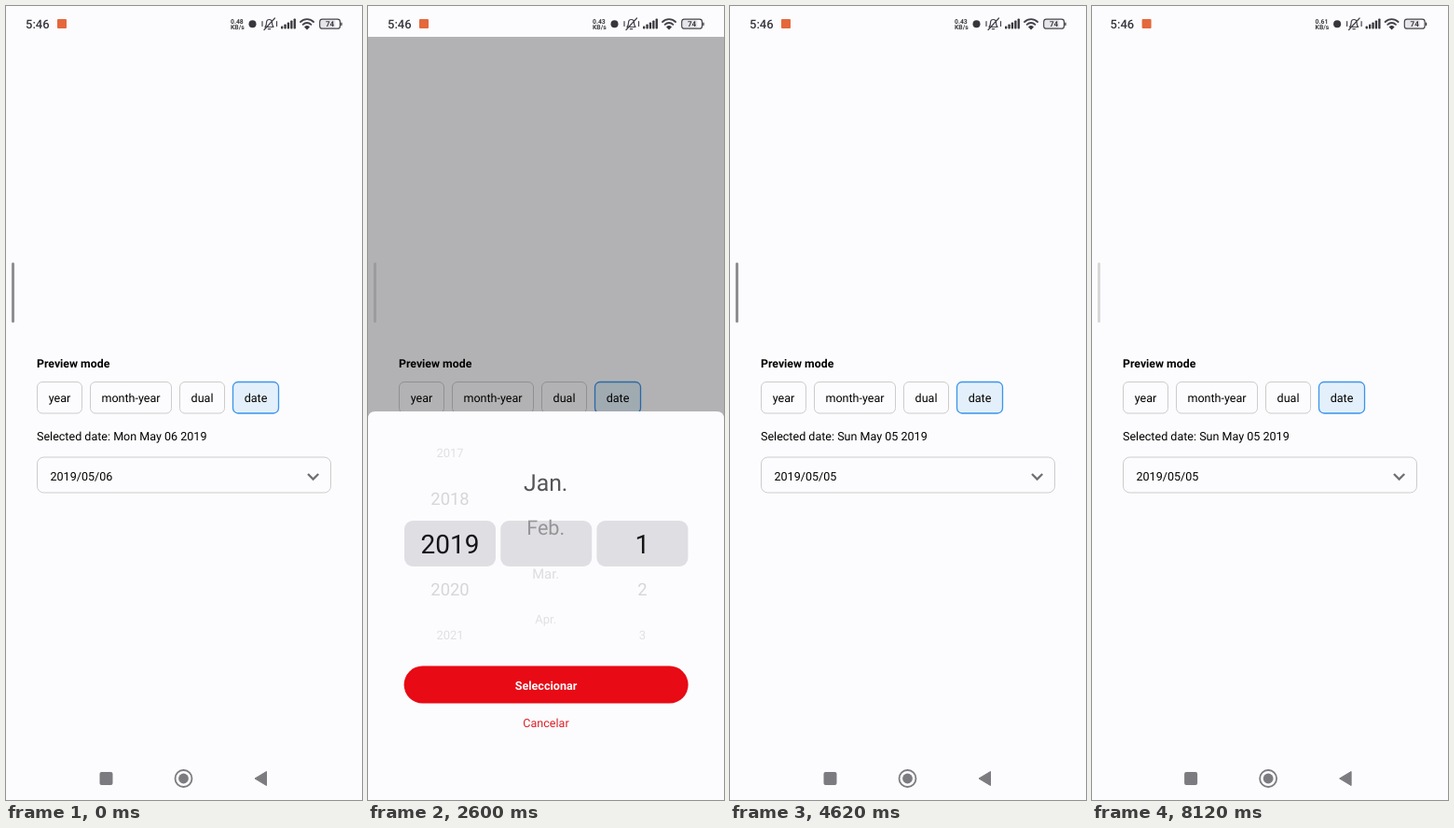
Recreate the animation shown at these times as an HTML page. Size 382 by 850 pixels, loop 8.16 s.

```html
<!DOCTYPE html>
<html lang="en">
<head>
<meta charset="utf-8">
<title>Date picker preview</title>
<style>
  html, body { margin: 0; width: 100%; height: 100%; overflow: hidden; background: #fcfcfe; }
  svg { display: block; width: 100vw; height: 100vh; font: 12.55px Roboto, sans-serif; text-rendering: geometricPrecision; }
  .mid { text-anchor: middle; }
  .bold { font-weight: 700; }
  .box { fill: none; stroke: #cccccc; }
  .line { fill: none; stroke: #42424a; stroke-linecap: round; stroke-linejoin: round; }
</style>
</head>
<body>
<svg viewBox="0 0 382 850">
  <defs>
    <clipPath id="wheelClip"><rect y="454" width="382" height="245"/></clipPath>
  </defs>
  <rect width="382" height="850" fill="#fcfcfe"/>

  <g id="page">
    <text class="bold" x="33" y="387" font-size="12.3">Preview mode</text>
    <g id="chips"></g>
    <text id="selected" x="33" y="465"></text>
    <g id="field">
      <rect class="box" x="33.5" y="483" width="315" height="38" rx="7"/>
      <text id="value" x="47.5" y="508"></text>
      <path d="M324 501l5.6 5.6 5.6-5.6" fill="none" stroke="#707074" stroke-width="2.3"/>
    </g>
  </g>

  <g id="modal">
    <rect y="33" width="382" height="817" fill="#000" fill-opacity=".295"/>
    <path d="M0 850V442q0-8 8-8H374q8 0 8 8V850z" fill="#fcfcfe"/>
    <g id="slots"></g>
    <g id="wheels" class="mid" clip-path="url(#wheelClip)"></g>
    <g id="button">
      <rect x="38.6" y="706.6" width="305" height="40" rx="20" fill="#e80a14"/>
      <text class="mid bold" x="191" y="731.5" fill="#fcfcfe">Seleccionar</text>
    </g>
    <text class="mid" x="191" y="771.5" fill="#dc2028">Cancelar</text>
  </g>

  <rect id="handle" x="6" y="274.5" width="3" height="64.5" rx="1.5"/>

  <g id="system">
    <g fill="#36363c">
      <text x="21" y="24" font-size="13" font-weight="500">5:46</text>
      <rect x="55" y="14" width="10" height="10" rx="1" fill="#e4683c"/>
      <g class="bold" font-size="6.8">
        <text id="speed" x="241" y="18.6"></text>
        <text x="241" y="25">KB/s</text>
      </g>
      <circle cx="264.5" cy="19.2" r="4"/>
      <path class="line" stroke-width="1.2" d="M278 22.5h9q-1.5-1.5-1.5-4.5a3 3.5 0 0 0-6 0q0 3-1.5 4.5M281.3 24.6h2.4M277 25.5L288.5 13M275 16.5v5M290.5 16.5v5"/>
      <g id="bars"></g>
      <path class="line" stroke-width="1.8" d="M316 17a10 10 0 0 1 14 0M318.6 19.8a6.3 6.3 0 0 1 8.8 0"/>
      <path d="M323 25.5l-3-3a4.3 4.3 0 0 1 6 0z"/>
      <rect x="337.5" y="15" width="16" height="8.5" rx="2" fill="#e6e6ea"/>
      <rect class="line" x="336.7" y="14.2" width="21.8" height="10" rx="2.8" stroke-width="1.2"/>
      <rect x="359.3" y="17.5" width="1.3" height="3.5" rx=".6"/>
      <text class="mid bold" x="347.6" y="22.2" font-size="8">74</text>
    </g>
    <g id="nav" fill="#7c7c80" stroke="#7c7c80">
      <rect x="100.5" y="820" width="14" height="14" rx="2" stroke="none"/>
      <circle cx="190.5" cy="827" r="9" fill="none" stroke-width="1.8"/>
      <circle cx="190.5" cy="827" r="5.4" stroke="none"/>
      <path d="M267 827l12.5-7.5v15z" stroke-linejoin="round"/>
    </g>
  </g>
</svg>

<script>
const LOOP = 8160;
const CENTER_Y = 576, ROW = 48.8;
const SECOND_OPEN = 4700, SECOND_CLOSE = 2720;   // delays of the repeated gestures
const SIZES = [28, 18.4, 13];
const GRAYS = [20, 214, 224];

const $ = id => document.getElementById(id);

function add(parent, tag, attrs, text = '') {
  const node = document.createElementNS('http://www.w3.org/2000/svg', tag);
  for (const name in attrs) node.setAttribute(name, attrs[name]);
  node.textContent = text;
  return parent.appendChild(node);
}

const lerp = (a, b, u) => a + (b - a) * u;
const clamp01 = u => Math.min(1, Math.max(0, u));

// Piecewise linear value through [time, value] keys.
function track(keys, t) {
  let value = keys[0][1];
  for (let i = 1; i < keys.length; i++) {
    const [t0, v0] = keys[i - 1], [t1, v1] = keys[i];
    if (t >= t0) value = lerp(v0, v1, clamp01((t - t0) / (t1 - t0)));
  }
  return value;
}

const withRepeat = (keys, delay) => keys.concat(keys.map(([t, v]) => [t + delay, v]));

const MODAL = [[1030, 0], [1250, 1], [4210, 1], [4430, 0], [5730, 0], [5950, 1], [6930, 1], [7150, 0]];
const BUTTON = withRepeat([[3960, 1], [4110, .2], [4160, .2], [4410, 1]], SECOND_CLOSE);
const FIELD = withRepeat([[870, 1], [1000, .3], [1100, .3], [1350, 1]], SECOND_OPEN);

const spin = (t, start, end, power) => 4 * (1 - (1 - clamp01((t - start) / (end - start))) ** power);

const MONTHS = 'Jan. Feb. Mar. Apr. May Jun. Jul. Aug. Sep. Oct. Nov. Dec.'.split(' ');
const count = (n, first) => Array.from({ length: n }, (_, i) => first + i);
const columns = [
  { x: 88, labels: count(12, 2015), flick: [1850, 2400, 3] },
  { x: 190.7, labels: MONTHS, flick: [2545, 2980, 3] },
  { x: 294.3, labels: count(31, 1), flick: [2980, 3710, 2.23] },
];

for (const [label, x, w] of [['year', 33, 49], ['month-year', 90, 88], ['dual', 186, 49], ['date', 243, 50]]) {
  const box = add($('chips'), 'rect', { class: 'box', x: x + .5, y: 402.5, width: w - 1, height: 33.5, rx: 5.5 });
  if (label === 'date') box.setAttribute('style', 'fill:#e3f0fb;stroke:#3a94ec;stroke-width:1.3');
  add($('chips'), 'text', { class: 'mid', x: x + w / 2, y: 424 }, label);
}
for (let i = 0; i < 5; i++) {
  const h = 3 + 2 * i;
  add($('bars'), 'rect', { x: 295 + 3.4 * i, y: 24.5 - h, width: 2.3, height: h, rx: .8 });
}
columns.forEach((column, i) => {
  add($('slots'), 'rect', { x: 39 + 103.2 * i, y: 551, width: 98, height: 49, rx: 9, fill: '#dfdfe3' });
  column.items = column.labels.map(label => add($('wheels'), 'text', { x: column.x }, label));
});

const position = (column, t) => t < 5500 ? spin(t, ...column.flick) : spin(t, 5700, 6100, 3);

// The highlight follows the nearest row over 120 ms.
function highlight(column, t) {
  let sum = 0;
  for (let back = 5; back < 120; back += 10) sum += Math.round(position(column, t - back));
  return sum / 12;
}

function drawColumn(column, t) {
  const pos = position(column, t), focus = highlight(column, t);
  column.items.forEach((item, i) => {
    const offset = i - pos;
    const visible = Math.abs(offset) < 3;
    item.style.display = visible ? '' : 'none';
    if (!visible) return;
    const distance = Math.min(2, Math.abs(i - focus));
    const from = Math.min(1, Math.floor(distance)), u = distance - from;
    const size = lerp(SIZES[from], SIZES[from + 1], u);
    const gray = Math.round(lerp(GRAYS[from], GRAYS[from + 1], u));
    item.setAttribute('font-size', size);
    item.setAttribute('y', CENTER_Y + offset * ROW + size * .355);
    item.setAttribute('fill', `rgb(${gray},${gray},${gray + 3})`);
  });
}

function draw(t) {
  const open = track(MODAL, t);
  const picked = t >= 4200;
  $('selected').textContent = 'Selected date: ' + (picked ? 'Sun May 05 2019' : 'Mon May 06 2019');
  $('value').textContent = picked ? '2019/05/05' : '2019/05/06';
  $('speed').textContent = t < 600 ? '0.48' : t < 5000 ? '0.43' : '0.61';
  $('system').setAttribute('transform', `translate(${t < 5000 ? 0 : -1.4} 0)`);
  $('modal').setAttribute('opacity', open);
  $('button').setAttribute('opacity', track(BUTTON, t));
  $('field').setAttribute('opacity', track(FIELD, t));
  $('nav').setAttribute('opacity', (1 - open) ** .5);
  $('handle').setAttribute('fill', t >= 7140 ? '#d8d8da' : open > .5 ? '#9c9c9e' : '#8f8f92');
  if (open) columns.forEach(column => drawColumn(column, t));
}

const begin = performance.now();
function frame() {
  draw((performance.now() - begin) % LOOP);
  requestAnimationFrame(frame);
}
frame();
</script>
</body>
</html>
```
